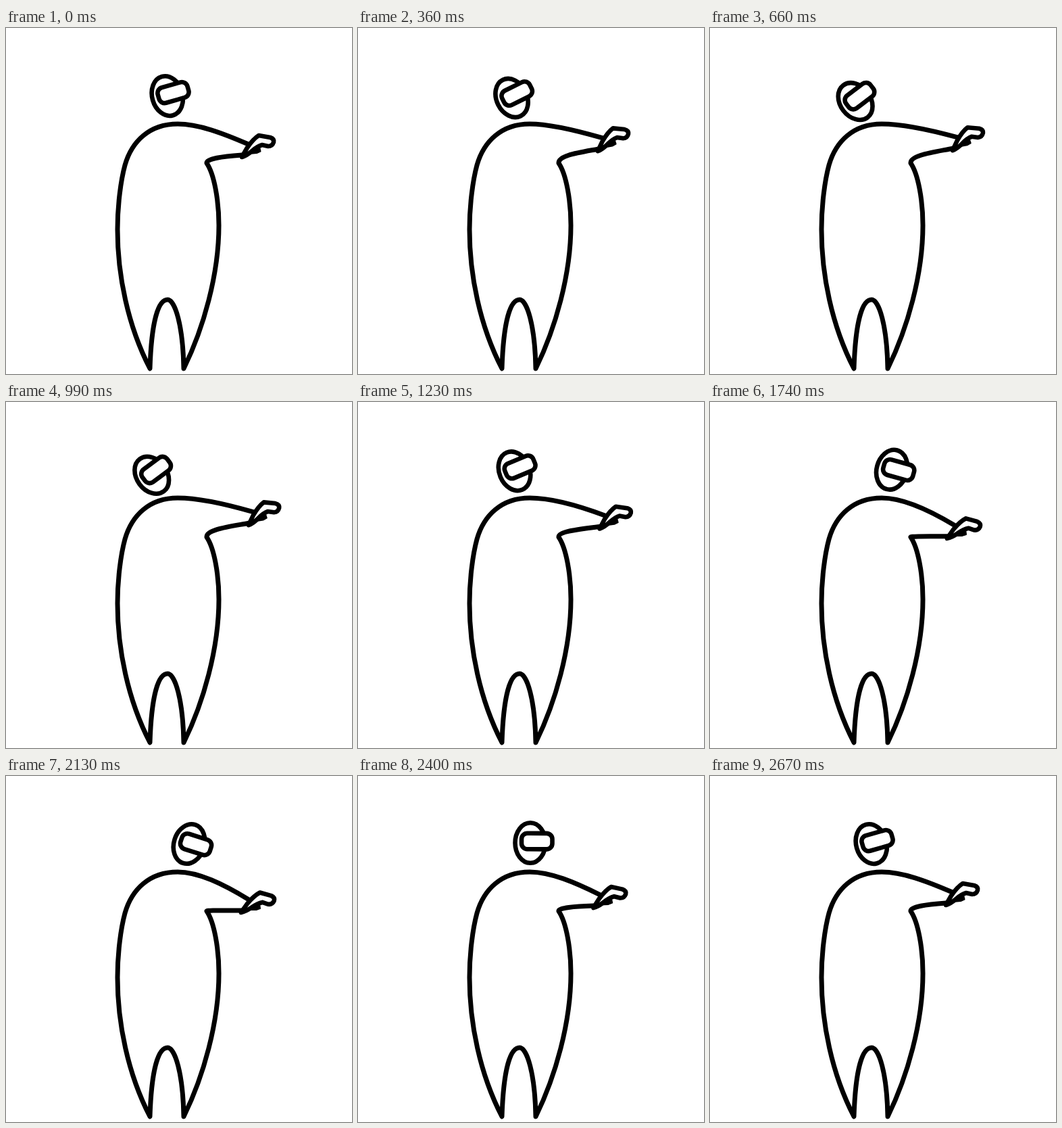
An HTML page that plays this animation: 512 by 512 pixels, repeating every 2700 ms.

```html
<!DOCTYPE html>
<html>
<head>
<meta charset="utf-8">
<style>
  html, body { margin: 0; width: 100%; height: 100%; overflow: hidden; background: #fff; }
  svg { display: block; width: 100vw; height: 100vh; }
  path, ellipse, rect { fill: #fff; stroke: #000; stroke-width: 6.6; stroke-linejoin: round; stroke-linecap: round; }
  #body { fill: none; stroke-width: 7; }
  #thumb { fill: #000; stroke-width: 2; }
</style>
</head>
<body>
<svg viewBox="0 0 512 512">
  <path id="body"/>
  <g id="head">
    <ellipse rx="22.5" ry="29.8"/>
    <rect x="-13" y="-14.2" width="45.5" height="23.5" rx="8.5"/>
  </g>
  <!-- hand drawn relative to its lower left corner -->
  <g id="hand">
    <path d="M0 0L8 -14Q17 -27 25 -32L42 -29Q48 -27 47 -22Q45 -16 39 -16L30 -18Q23 -16 15 -9Q7 -2 0 0Z"/>
    <path id="thumb" d="M11 -5L26 -15L27.500 -8.500L22 -6Z"/>
  </g>
</svg>
<script>
const LOOP = 2700, STEP = 30;
const body = document.getElementById('body');
const head = document.getElementById('head');
const hand = document.getElementById('hand');

// [time, value] keys, eased in and out between neighbours
const headTilt = [[0, -16], [750, -38], [900, -38], [1860, 18], [2100, 18], [2680, -16]];
const handX = [[0, 349], [650, 359], [950, 359], [2150, 347.8], [2670, 349]];
const handY = [[0, 191], [450, 181.2], [850, 181.2], [1950, 204], [2670, 191]];

function track(keys, t) {
  const i = keys.findIndex(key => key[0] > t);
  if (i < 0) return keys[keys.length - 1][1];
  const [t0, a] = keys[i - 1], [t1, b] = keys[i];
  const u = (t - t0) / (t1 - t0);
  return a + (b - a) * u * u * (3 - 2 * u);
}

function drawHead(t) {
  const tilt = track(headTilt, t);
  const x = 254.9 + 0.96 * tilt - 0.003 * tilt * tilt;
  const y = 99 + 0.006 * (x - 255) ** 2;
  head.setAttribute('transform', `translate(${x} ${y}) rotate(${tilt})`);
}

function drawArm(t) {
  const x = track(handX, t), y = track(handY, t);
  const drop = y - 191;
  hand.setAttribute('transform', `translate(${x} ${y}) rotate(${drop / 2})`);

  const topX = x + 8.5 + drop * 0.2, topY = y - 19.5;
  const topSlope = 0.43 + drop * 0.016;
  const lowY = y - 3;
  const lowSlope = Math.max(0, 0.08 - drop * 0.012);
  body.setAttribute('d', `M${topX} ${topY}
    C${topX - 37} ${topY - 37 * topSlope} 285 142 254 142
    C212 142 186 168 176 203 C170 225 165 262 165 298
    C165 365 180 440 213 504 C215 440 224 402 239 402
    C250 402 262 440 263 504 C292 445 315 365 315 292
    C315 255 308 216 297 200
    C296 ${193 + drop / 2} ${x - 28} ${lowY + 28 * lowSlope} ${x} ${lowY}`);
}

function frame(now) {
  const t = Math.floor((now % LOOP) / STEP) * STEP;
  drawHead(t);
  drawArm(t);
  requestAnimationFrame(frame);
}
frame(performance.now());
</script>
</body>
</html>
```
